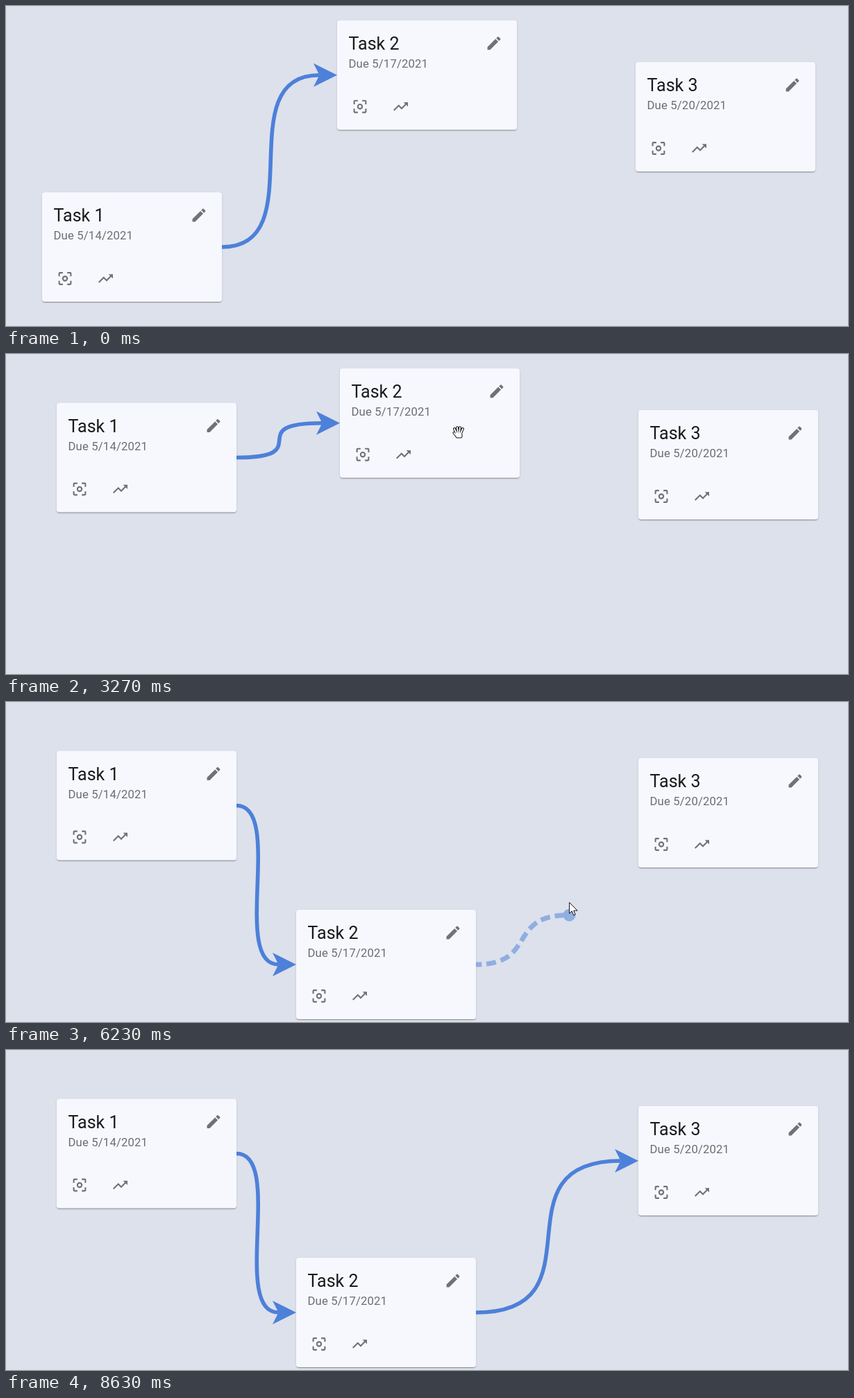
An HTML page that plays this animation: 1213x462 px, repeating every 9100 ms.

```html
<!DOCTYPE html>
<html lang="en">
<head>
<meta charset="utf-8">
<title>Linked task cards</title>
<style>
  html, body { margin: 0; width: 100%; height: 100%; overflow: hidden; background: #dde1ec; }
  body { position: relative; font-family: Roboto, Arial, sans-serif; }
  .card {
    position: absolute; left: 0; top: 0; width: 259px; height: 158px;
    border-radius: 4px; background: #f7f8fe;
    box-shadow: 0 2px 1px -1px rgba(0,0,0,.2), 0 1px 1px rgba(0,0,0,.14), 0 1px 3px rgba(0,0,0,.12);
  }
  .card.over { background: #a9bfea; }
  svg { position: absolute; left: 0; top: 0; display: block; }
  #stage { z-index: 2; }
  .title { font-size: 25px; fill: rgba(0,0,0,.9); }
  .due { font-size: 16.7px; letter-spacing: .157px; fill: rgba(0,0,0,.56); }
  .icon { fill: #000; opacity: .54; }
  .line { fill: none; stroke: #000; stroke-width: 2; }
  .link { fill: none; stroke: #4d80d9; stroke-width: 5.6; }
  .head { fill: #4d80d9; }
  .rim { fill: #111; stroke: #111; stroke-width: 4; stroke-linecap: round; stroke-linejoin: round; }
  .skin { fill: #fff; stroke: #fff; stroke-width: 1.9; stroke-linecap: round; stroke-linejoin: round; }
  #arrow { fill: #fff; stroke: #111; }
  #press { fill: #fffb78; mix-blend-mode: multiply; }
</style>
</head>
<body>
<svg id="stage" width="1213" height="462" viewBox="0 0 1213 462">
  <g id="solid"></g>
  <g id="draft" opacity=".52">
    <path class="link" id="dash" style="stroke-width:7" stroke-dasharray="14 7"/>
    <circle class="head" id="ball" r="9"/>
  </g>
  <g id="cursor">
    <path id="arrow" d="M.5 .5V16.4l3.6-3.4 2.6 6 2.4-1-2.5-5.8H12Z"/>
    <g id="open"></g>
    <g id="fist"></g>
  </g>
  <circle id="press" r="12.5"/>
</svg>
<script>
const LOOP = 9100, W = 259, H = 158, MID = H / 2;
const GRAB = 2160, SHIFT = 2790, LINK = 5330, DROP = 7350, LEAVE = 8630;
const $ = id => document.getElementById(id);

// A route is a starting point and its moves: start, end, x, y, easing of x.
const smooth = f => f * f * (3 - 2 * f);
const late = f => f ** 1.87;
const CARDS = [
  { name: "Task 1", due: "5/14/2021", from: [52, 269], moves: [[2300, SHIFT, 73, 70.5]] },
  { name: "Task 2", due: "5/17/2021", from: [477, 20.7], moves: [[SHIFT, SHIFT, 481, 20.7], [3490, 3970, 418, 300]] },
  { name: "Task 3", due: "5/20/2021", from: [907, 81], moves: [[SHIFT, SHIFT, 911, 81]] }
];
const POINTER = {
  from: [741, 430],
  moves: [
    [1060, 1960, 257.5, 373.5],
    [2200, 2720, 279, 157],
    [2860, 3250, 652, 113],
    [3490, 3970, 585, 395.5],
    [4500, 4710, 528, 440],
    [4980, 5120, 511, 425],
    [LINK, 5880, 789, 351],
    [5880, 6860, 940, 139, late],
    [6930, 7280, 1001, 168],
    [8280, LEAVE, 1150, 465]
  ]
};
const PRESSED = [[GRAB, SHIFT], [3490, 4500], [5190, LINK]];

function locate({ from, moves }, t) {
  return moves.reduce(([x, y], [start, end, toX, toY, easeX = smooth]) => {
    if (t < start) return [x, y];
    const f = Math.min(1, (t - start) / (end - start || 1));
    return [x + (toX - x) * easeX(f), y + (toY - y) * smooth(f)];
  }, from);
}

const within = ([a, b], t) => t >= a && t < b;
const inside = ([px, py], [x, y]) => px >= x && px <= x + W && py >= y && py <= y + H;
const show = (el, on) => el.style.display = on ? "" : "none";
const move = (el, [x, y]) => el.setAttribute("transform", `translate(${x} ${y})`);
const curve = (x1, y1, x2, y2, pull) =>
  `M${x1} ${y1}C${x1 + pull} ${y1} ${x2 - pull} ${y2} ${x2} ${y2}`;

const PENCIL = `<path d="M3 21v-3.75L14.06 6.19l3.75 3.75L6.75 21z
  M15.13 5.12l1.83-1.83q.7-.6 1.41 0l2.34 2.34q.6.7 0 1.41l-1.83 1.83z"/>`;
const FOCUS = [0, 90, 180, 270].map(a =>
  `<path class="line" d="M4 9V5Q4 4 5 4H9" transform="rotate(${a} 12 12)"/>`).join("") +
  `<circle class="line" cx="12" cy="12" r="3"/>`;
const TREND = `<path class="line" d="M2.7 17.3l6.7-6.7 4 4 6.3-6.3"/><path d="M16 6h6v6z"/>`;

const icon = (shape, x, y) =>
  `<g class="icon" transform="translate(${x} ${y}) scale(1.05) translate(-12 -12)">${shape}</g>`;

// Four fanned fingers, a thumb and a palm, drawn as a dark rim and a white fill.
function hand(reach, spread) {
  let d = "M-3 2H3.5V6.5H-2.5ZM-3 5L-6.5 1";
  for (let s = -1.5; s <= 1.5; s++) {
    d += `M${s * 2.2} 1L${s * spread} ${-reach * (1 - s * s * .13)}`;
  }
  return `<path class="rim" d="${d}"/><path class="skin" d="${d}"/>`;
}

function build() {
  for (const card of CARDS) {
    card.el = document.createElement("div");
    card.el.className = "card";
    card.el.innerHTML = `<svg width="${W}" height="${H}">
      <text class="title" x="16.5" y="42">${card.name}</text>
      <text class="due" x="16.5" y="68">Due ${card.due}</text>
      ${icon(PENCIL, 226, 33)}${icon(FOCUS, 33, 124.5)}${icon(TREND, 91.5, 124.5)}</svg>`;
    document.body.insertBefore(card.el, $("stage"));
  }
  $("open").innerHTML = hand(7, 4);
  $("fist").innerHTML = hand(3.5, 3.2);
}

function solidLink([ax, ay], [bx, by]) {
  const x = ax + W, y = ay + MID, tipY = by + MID, size = 34;
  const d = curve(x, y, bx - size * .75, tipY, (bx - x) * .8);
  return `<path class="link" d="${d}"/>
    <path class="head" d="M${bx} ${tipY}l${-size} ${-size / 2} ${size / 4} ${size / 2} ${-size / 4} ${size / 2}z"/>`;
}

function drawDraft(t, [cx, cy]) {
  // The ball trails the pointer a little.
  const [px, py] = locate(POINTER, t - 70);
  const bx = px + 8, by = py - 1;
  const x = cx + W, end = bx - 2;
  const on = within([LINK, DROP], t) && end > x;
  show($("draft"), on);
  if (!on) return;
  $("dash").setAttribute("d", curve(x, cy + MID, end, by, 62 + (end - x) * .2));
  $("dash").setAttribute("stroke-dashoffset", 6 - 21 * (t - 6230) / 1000);
  move($("ball"), [bx, by]);
}

function drawPointer(t, pos, places) {
  const held = PRESSED.some(p => within(p, t));
  const onCard = places.some(p => inside(pos, p));
  show($("cursor"), within([POINTER.moves[0][0], LEAVE], t));
  move($("cursor"), pos);
  show($("arrow"), !onCard);
  show($("open"), onCard && !held);
  show($("fist"), onCard && held);
  show($("press"), held);
  move($("press"), pos);
}

function draw(t) {
  const places = CARDS.map(c => locate(c, t));
  const pos = locate(POINTER, t);
  CARDS.forEach((c, i) => {
    const [x, y] = places[i];
    c.el.style.transform = `translate(${x}px, ${y}px)`;
  });
  CARDS[2].el.classList.toggle("over", within([LINK, DROP], t) && inside(pos, places[2]));
  $("solid").innerHTML = solidLink(places[0], places[1]) +
    (t >= DROP ? solidLink(places[1], places[2]) : "");
  drawDraft(t, places[1]);
  drawPointer(t, pos, places);
}

build();
const began = performance.now();
function tick() {
  draw((performance.now() - began) % LOOP);
  requestAnimationFrame(tick);
}
tick();
</script>
</body>
</html>
```
